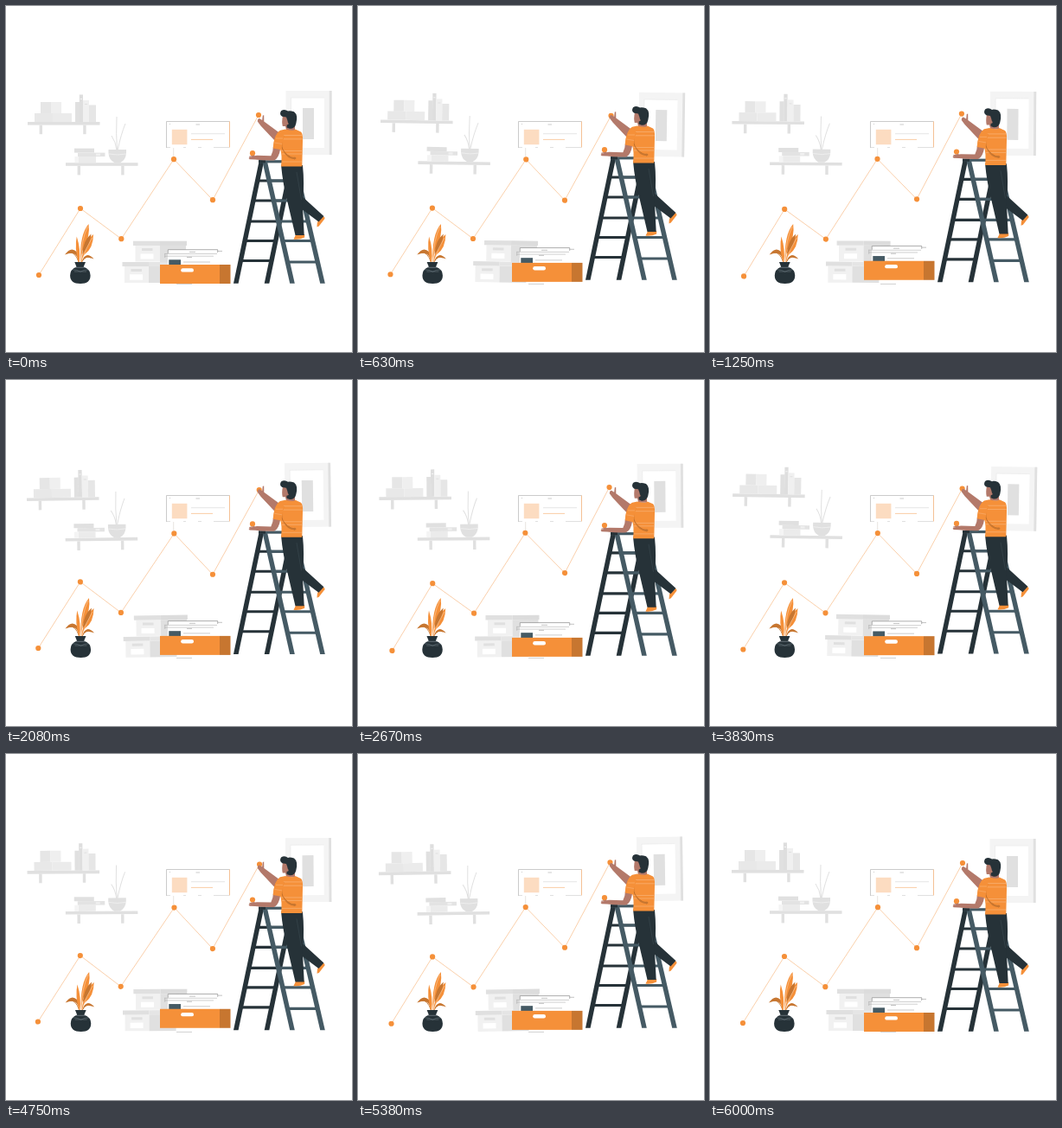
An HTML page with a canvas for the animation above (6.04 s loop, 400x400 px).

```html
<!DOCTYPE html>
<html lang="en">
<head>
<meta charset="utf-8">
<title>Growth chart</title>
<style>
  html, body { margin: 0; width: 100%; height: 100%; overflow: hidden; background: #fff; }
  canvas { display: block; width: 100vw; height: 100vh; }
</style>
</head>
<body>
<canvas id="stage"></canvas>
<script>
const canvas = document.getElementById('stage');
const ctx = canvas.getContext('2d');
const LOOP = 6040, STEP = 1000 / 24;
const ORANGE = '#f59039', RUST = '#c77630', DARK = '#263238', SLATE = '#455a64', SKIN = '#b3796a';
const G1 = '#f4f4f4', G2 = '#ebebeb', G3 = '#e0e0e0';

function rect(x1, y1, x2, y2, color) {
  ctx.fillStyle = color;
  ctx.fillRect(x1, y1, x2 - x1, y2 - y1);
}
function shape(path, color) {
  ctx.fillStyle = color;
  ctx.fill(new Path2D(path));
}
function stroke(path, color, width = 0.6) {
  ctx.strokeStyle = color;
  ctx.lineWidth = width;
  ctx.stroke(new Path2D(path));
}
function dot(x, y, r = 3.1, color = ORANGE) {
  ctx.fillStyle = color;
  ctx.beginPath();
  ctx.arc(x, y, r, 0, Math.PI * 2);
  ctx.fill();
}
function moved(dx, dy, draw) {
  ctx.save();
  ctx.translate(dx, dy);
  draw();
  ctx.restore();
}
function turned(x, y, deg, draw) {
  ctx.save();
  ctx.translate(x, y);
  ctx.rotate(deg * Math.PI / 180);
  ctx.translate(-x, -y);
  draw();
  ctx.restore();
}

// 0 -> 1 -> 0 over one period
const rise = (t, period) => 1 - Math.abs(1 - 2 * (t / period % 1));
// 0 -> 1 -> -1 -> 0 over one period
function sway(t, period) {
  const p = t / period % 1;
  return p < 0.25 ? p * 4 : p < 0.75 ? 2 - p * 4 : p * 4 - 4;
}

function shelf(x, y) {
  rect(x, y, x + 83.5, y + 3.6, G3);
  rect(x + 13.6, y + 3.6, x + 17, y + 14.2, G3);
  rect(x + 64.2, y + 3.6, x + 67.6, y + 14.2, G3);
}

function room() {
  shelf(25, 134);
  rect(33, 124, 54, 134, '#e8e8e8');
  rect(54, 124, 76, 134, G2);
  rect(40, 111, 52, 124, '#e6e6e6');
  rect(52, 111, 64, 124, '#efefef');
  rect(80, 111, 85, 134, G3);
  rect(84.8, 102.5, 89, 134, '#dedede');
  rect(89, 109, 96, 134, '#f0f0f0');
  rect(96, 114.5, 104, 134, '#e6e6e6');
  rect(91, 113, 94, 114, G3);
  rect(85.8, 107, 88, 108, G1);

  shelf(69, 181.2);
  rect(79, 164.6, 102, 169.6, G3);
  rect(83, 169.6, 114.5, 174, '#e3e3e3');
  rect(104, 170.6, 109, 173, '#f0f0f0');
  rect(84, 174, 104, 181.2, G2);
  rect(79.5, 174, 84, 181.2, G1);
  stroke('M128.5 167Q127 148 128 128', G3, 1);
  stroke('M129 167Q133 148 138 136', G3, 1);
  stroke('M128 167Q127 157 122 150', G3, 1);
  shape('M118.5 166H139V170Q138.5 178 132 181.2H125.5Q119 178 118.5 170Z', G3);
  stroke('M119 171Q129 173 138.8 171', G1, 0.7);

  rect(323.5, 98, 376.5, 172, G1);
  rect(373.8, 98, 376.6, 172, G3);
  rect(329.5, 106, 368, 164, '#fff');
  stroke('M329.5 164V106H368', G2, 0.8);
  rect(343, 118, 356, 154, G3);

  rect(149.5, 277, 178, 295.5, '#f1f1f1');
  rect(178, 277, 208, 300, G3);
  rect(147, 271.7, 178, 277, G3);
  rect(178, 271.7, 209, 277, '#dcdcdc');
  rect(157, 280, 169.5, 283, G3);
  rect(155.5, 286.5, 170.5, 292.5, '#fff');
  rect(137, 301, 165, 320, '#f1f1f1');
  rect(165, 301, 196, 320, G3);
  rect(134.5, 296, 165, 301, G3);
  rect(165, 296, 196, 301, '#e5e5e5');
  rect(144.5, 304, 157, 307, G3);
  rect(143, 310.3, 158, 316.7, '#fff');
}

function card() {
  rect(185.3, 133.3, 258.8, 163.8, '#fff');
  stroke('M185.5 164V133.5H258.5', '#b5b5b5', 0.7);
  stroke('M258.5 133.5V163.5', '#f3b27a', 0.8);
  stroke('M185.5 163.5H190M205 163.5H208M222 163.5H226M240 163.5H258', '#ccc', 0.6);
  rect(191.8, 142.8, 209.4, 160.2, '#fcdcc1');
  stroke('M219.5 137H224M189 136.5H190', '#aaa', 0.6);
  stroke('M214 147.7H253', '#d3d3d3', 0.6);
  stroke('M214 154.4H239', '#f8c08f', 0.8);
  stroke('M193.7 164V174', '#d0c8c0', 0.5);
}

function graph() {
  const pts = [[38, 311], [86, 234], [133.3, 269.2], [194, 177.2], [239, 224.2], [292, 126]];
  stroke('M' + pts.join('L'), '#f8b67e', 0.65);
  for (const [x, y] of pts) dot(x, y);
}

function plant() {
  stroke('M84 296Q80 284 73 285M87 297Q91 287 98 291', RUST, 0.9);
  shape('M84 294Q81 284 73 286L68 287.5Q75 277.5 81.5 284Q84 287 84 294Z', RUST);
  shape('M88 296Q89 289 94 288Q98 288 101.5 292.5Q96 290 93 291Q90 292 88 296Z', RUST);
  shape('M83.8 296Q79 280 81.8 266.5Q86.5 281 84.8 296Z', ORANGE);
  shape('M86 296Q85 264 95.5 252Q97.5 266 90 279Q87 286 86.7 296Z', ORANGE);
  shape('M87 295Q90 273 101 264Q101 280 91 287Q88.5 290 88 296Z', ORANGE);
  shape('M88.2 287Q89 271 98.5 263.5Q98 275 88.2 287Z', RUST);
  stroke('M86.2 296Q87 270 94.5 255M87.5 295Q92 280 99.5 268', '#fff2e4', 0.4);
  shape('M79.3 296H92L89.7 301.5Q97.6 304.5 97.6 311.5Q97.5 321 86 321Q74.2 321 74.1 311.5Q74.1 304.5 81.5 301.5Z', DARK);
  stroke('M80 302.3H91.5', '#8d999e', 0.6);
  stroke('M77 304.8Q82 304.8 86 307.2Q90 304.8 95 304.8M79 307H93', '#75838a', 0.5);
}

function papers() {
  rect(187, 281.5, 245, 299, '#fff');
  stroke('M187.3 286V281.7H244.7V285', '#777', 0.6);
  stroke('M245 283.4H250', '#999', 0.6);
  stroke('M183.5 286.5H244M183.5 289.2H240M183.7 286V291', '#aaa', 0.55);
  stroke('M212 284.4H219M209 290.5H215', '#999', 0.6);
  stroke('M205 296H236', '#aaa', 0.6);
  rect(188.3, 293.3, 202, 299.5, SLATE);
}

function crate() {
  papers();
  rect(178, 299, 247, 321, ORANGE);
  rect(247, 299, 259.5, 321, RUST);
  ctx.fillStyle = '#fff';
  ctx.beginPath();
  ctx.roundRect(202.2, 303.2, 14.8, 4.4, 2.2);
  ctx.fill();
}

function ladder() {
  const rungs = [202, 225, 249, 271.5, 294.5];
  const along = (a, b, y) => a + (b - a) * (y - 181) / 140;
  const rail = (a, b, color) =>
    shape(`M${a - 2.8} 179H${a + 2.8}L${b + 2.8} 320.8H${b - 2.8}Z`, color);
  rail(331, 301.5, DARK);
  for (const y of rungs) {
    stroke(`M${along(295.5, 265.8, y)} ${y}H${along(331, 301.5, y)}`, DARK, 3.2);
    const dy = y > 290 ? 1.5 : 0;
    stroke(`M${along(299, 331, y)} ${y + dy}H${along(333, 366, y)}`, SLATE, 3.2);
  }
  rail(295.5, 265.8, DARK);
  rail(333, 366, SLATE);
  rail(299, 331, SLATE);
  rect(292, 178.2, 326, 181.4, SLATE);
  rect(292, 178.2, 300, 181.4, DARK);
}

function man() {
  // reaching arm
  shape('M318 148L311 156L294.5 138.5L290.8 133.5Q290.8 130 293 130L296.2 132L296.8 126.5L298.2 126.2L298.3 133.5Z', SKIN);
  // feet
  shape('M335 264H345.2V267.5Q339 270.5 332.4 269.6Q334 267 335 264Z', ORANGE);
  shape('M361.2 247L365 243Q369 243 368.4 246L361.8 254.5L359.5 255.4Q359.5 250 361.2 247Z', ORANGE);
  // trousers
  shape('M331 184H343Q345 207 343.3 221L367.4 243L361.5 249.5L335.5 230Z', DARK);
  shape('M318 183.5L342.8 184Q344 210 342.7 227L344.7 265H334.5L325.8 228Q320 206 318 183.5Z', DARK);
  stroke('M336 192Q339 210 341.5 224', '#3c4a51', 0.6);
  // neck and face
  shape('M320 127Q318.5 134 319.8 139H323L324.3 144H334V134L329 126Z', SKIN);
  // shirt
  shape('M323 142.6Q333 145 334.5 142.6L341 145.5Q343.5 148 343 156L342.3 185.5H318Q319.5 172 317 165L309 162Q310.5 148 317 143.8Z', ORANGE);
  stroke('M317 149.5H342.6M318 153.8H342.8M318.5 167.5H342.4M319 171H342.2M319 180H342', '#f9b982', 0.6);
  stroke('M321 150Q317 160 320 166Q324 173 334 177', '#b96a27', 0.9);
  shape('M320 167Q327 176 334 174.5Q337 176 334 177.3Q325 177 320 167Z', RUST);
  // resting arm
  shape('M309 162L317.2 165Q315.5 176 310 178.5Q297 178.7 288 177.6L281.5 177.3L281 175.6L286 173.4L290 172.8L306.3 173.2Q309 168 309 162Z', SKIN);
  shape('M317 144Q310 148 308.7 164.5L318 166.3L321.5 150Z', ORANGE);
  stroke('M310.5 158L319 159.5M312 153H320', '#f9b982', 0.5);
  dot(285, 170.2);
  stroke('M281.3 174.4L287.5 173.2M280.8 176H288', SKIN, 1.2);
  // hair
  shape('M324.5 140.5L328 141.8Q334 142 335.3 136Q338 126 333 122.2Q328 120.5 326 121.5Q322 118.5 318 121.2Q315.5 125.2 319.3 127.8L324 128.5Q325.5 132 326 135Q324 137 324.5 140.5Z', DARK);
  dot(325.3, 136, 1.3, SKIN);
}

function draw(t) {
  room.angle = sway(t, 3000);
  turned(201, 209, room.angle, room);
  card();
  turned(165, 219, sway(t, 1500), graph);
  stroke('M197 321.4H215', '#b0b0b0', 0.6);
  moved(0, -5.1 * rise(t, 3000), crate);
  moved(0.8 * rise(t, 3000), 0, plant);
  moved(0, -4.8 * rise(t, 1500), () => { ladder(); man(); });
}

function frame(now) {
  const w = innerWidth, h = innerHeight, d = devicePixelRatio || 1;
  if (canvas.width !== Math.round(w * d) || canvas.height !== Math.round(h * d)) {
    canvas.width = Math.round(w * d);
    canvas.height = Math.round(h * d);
  }
  ctx.setTransform(canvas.width / 400, 0, 0, canvas.height / 400, 0, 0);
  rect(0, 0, 400, 400, '#fff');
  const k = Math.min(144, Math.floor((now % LOOP + 5) / STEP));
  draw(k * STEP);
  requestAnimationFrame(frame);
}
const start = performance.now();
frame(0);
function tick() { return performance.now() - start; }
</script>
</body>
</html>
```
